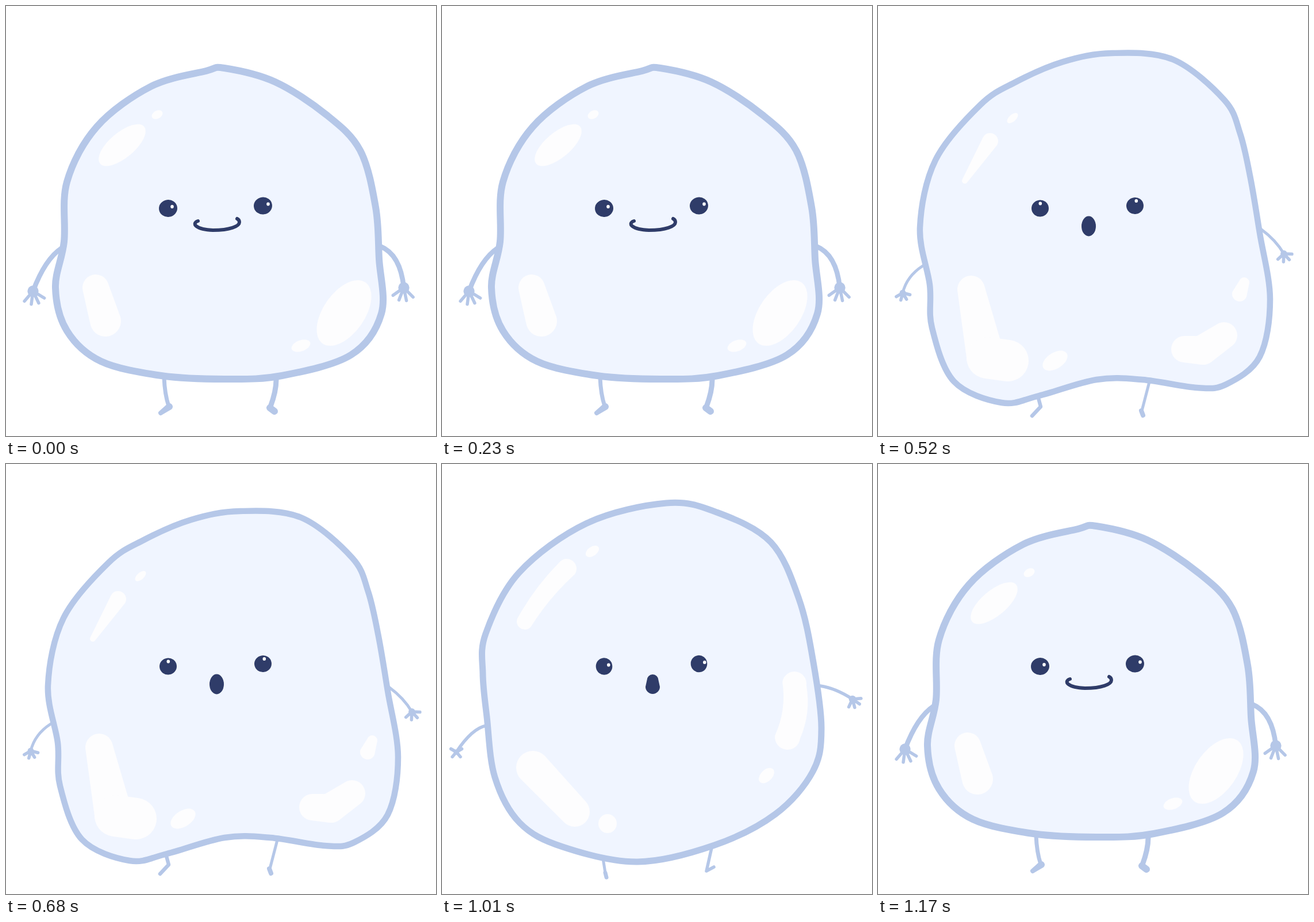
Write an HTML page that moves like this. It is 748 px wide and 748 px high and loops after 1.43 s.

```html
<!DOCTYPE html>
<html lang="en">
<head>
<meta charset="utf-8">
<title>Wobbling blob</title>
<style>
html, body { margin: 0; width: 100%; height: 100%; overflow: hidden; background: #fff; }
svg { display: block; width: 100%; height: 100%; }
</style>
</head>
<body>
<svg id="stage" viewBox="0 0 748 748"></svg>
<script>
const RIM = '#b5c7e8', SKIN = '#f0f5ff', INK = '#2f3c69', SHINE = '#fdfdfe';
const LOOP = 1430;

// Closed smooth curve through a few key points, outlined by the rim.
function body(points, rim) {
  const p = points.split(' ').map(s => s.split(',').map(Number));
  const at = i => p[(i + p.length) % p.length];
  const handle = (i, k) => at(i).map((v, a) => v + k * (at(i + 1)[a] - at(i - 1)[a]) / 6);
  const curves = p.map((_, i) => `C${handle(i, 1)} ${handle(i + 1, -1)} ${at(i + 1)}`);
  return `<path d="M${p[0]}${curves.join('')}Z" fill="${SKIN}" stroke="${RIM}" stroke-width="${rim}"/>`;
}

const oval = (x, y, rx, ry, turn = 0, fill = SHINE) =>
  `<ellipse cx="${x}" cy="${y}" rx="${rx}" ry="${ry}" fill="${fill}" transform="rotate(${turn} ${x} ${y})"/>`;

const line = (d, width, color = RIM) =>
  `<path d="${d}" fill="none" stroke="${color}" stroke-width="${width}" stroke-linecap="round" stroke-linejoin="round"/>`;

// Two round ends of different size joined by gently bent sides.
function bean(x1, y1, r1, x2, y2, r2, bend = 0, fill = SHINE) {
  const length = Math.hypot(x2 - x1, y2 - y1);
  const nx = (y1 - y2) / length, ny = (x2 - x1) / length;
  const off = (x, y, r) => `${x + nx * r} ${y + ny * r}`;
  const middle = r => off((x1 + x2) / 2, (y1 + y2) / 2, bend + r);
  const r = (r1 + r2) / 2;
  return `<path fill="${fill}" d="M${off(x1, y1, r1)}Q${middle(r)} ${off(x2, y2, r2)}
    A${r2} ${r2} 0 0 0 ${off(x2, y2, -r2)}Q${middle(-r)} ${off(x1, y1, -r1)}A${r1} ${r1} 0 0 0 ${off(x1, y1, r1)}Z"/>`;
}

// Arm from a shoulder path to a palm with four evenly fanned fingers.
function arm(shoulder, x, y, width, reach, aim, spread) {
  const fingers = [-1.5, -.5, .5, 1.5].map(i => {
    const a = (aim + i * spread) * Math.PI / 180;
    return `M${x} ${y}l${reach * Math.cos(a)} ${reach * Math.sin(a)}`;
  });
  return line(`M${shoulder} ${x} ${y}`, width) + oval(x, y, reach * .42, reach * .42, 0, RIM) + line(fingers.join(''), 5.5);
}

// Both eyes, with glints shifted towards the gaze.
function eyes(rx, ry, gazeX, gazeY) {
  return [[282, 352, 0], [447, 347.5, 2]].map(([x, y, shift]) =>
    oval(x, y, rx, ry, -8, INK) + oval(x + gazeX + shift, y + gazeY, 2.8, 3.1, 0, '#fff')).join('');
}

const resting = [
  arm('97 421Q68 440', 47, 496, 8.5, 23, 81, 33),
  arm('651 418Q686 432', 692, 490, 8.5, 23, 95, 33),
  line('M275 646Q276 675 283 696', 7),
  bean(284, 697, 6, 269, 708, 4, 0, RIM),
  line('M470 650Q470 670 460 697', 9),
  bean(459, 699, 6, 467, 705, 6, 0, RIM),
  body('380,108 468,132 557,189 616,251 643,350 649,440 653,535 600,607 480,643 380,649 270,643 165,618 106,565 86,490 101,410 106,306 158,210 252,140 348,113', 12),
  oval(202, 242, 50, 22, -40),
  oval(263, 189, 10, 7, -30),
  bean(156, 490, 23, 173, 548, 27),
  oval(588, 534, 65, 36, -55),
  oval(513, 591, 17, 9.5, -20),
  eyes(16, 15, 7, -3),
  line('M334 374C322 378 330 389 360 390C390 390 406 383 406 376Q406 372 402 370', 6, INK)
];

const round = [
  arm('87 439Q70 460', 67, 495, 7, 20, 87, 29),
  arm('663 436Q686 470', 688, 512, 7, 17, 100, 33),
  line('M281 683L283 697L270 711', 8),
  line('M463 682L456 703L461 712', 8),
  oval(375.5, 395.5, 290.1, 304.4, 21.3, RIM),
  oval(375.5, 397.5, 276.5, 292, 21.3, SKIN),
  oval(226, 208, 47, 20, -42),
  oval(283.5, 165, 11, 6, -38),
  bean(160, 474, 23, 232, 589, 25),
  oval(292.5, 627, 17, 14, 12),
  oval(504, 590, 44, 20, -38),
  bean(585, 505, 6.5, 557, 539, 10, -8),
  eyes(16, 15, 7, -3),
  line('M317 376C317 386 340 388 365 391C395 388 413 383 416 369', 5.5, INK)
];

const slumped = [
  arm('78 452Q50 470', 43, 499, 5, 13, 82, 45),
  arm('666 388Q692 407', 706, 431, 5, 14, 70, 45),
  line('M279 682L283 697L268 713', 6.5),
  line('M472 654L459 704', 5),
  line('M458 704L461 712', 8),
  body('407,82 513,93 602,163 630,222 648,300 664,395 682,510 664,610 606,658 555,664 460,650 380,650 280,678 215,690 132,653 94,560 90,485 73,385 100,268 178,172 240,132 322,97', 10.5),
  bean(195, 235, 14, 151, 304, 5),
  oval(234, 195, 11.5, 6, -42),
  bean(162, 493, 24, 187, 610, 33),
  bean(190, 612, 36, 226, 617, 36),
  oval(308, 617, 24, 14, -32),
  bean(533, 597, 23, 565, 599, 25),
  bean(565, 598, 26, 602, 573, 23),
  bean(637, 481, 9, 629, 501, 13),
  eyes(15, 14.5, .3, -8.5),
  oval(366.5, 383, 12.5, 17.5, 0, INK)
];

const stretched = [
  arm('77 455Q52 460', 25, 501, 5.5, 11, 90, 80),
  arm('658 386Q685 390', 714, 409, 5.5, 15, 55, 40),
  line('M280 686L284 711', 5),
  line('M284 711L286 719', 7),
  line('M469 668L460 708L473 701', 5.5),
  body('390,68 478,84 572,136 621,235 646,345 660,460 645,535 580,609 474,663 340,692 210,666 135,624 92,545 78,440 71,365 76,295 134,189 252,103', 11),
  bean(217, 182, 17, 144, 274, 14, 8),
  oval(261.5, 152, 13, 8, -35),
  bean(158, 528, 29, 231, 605, 26),
  oval(288, 625.5, 16, 16.5),
  bean(613, 382, 21, 601, 475, 22, -14),
  oval(564.5, 542, 16, 10, -45),
  eyes(14.3, 14.7, 7.8, -2.5),
  bean(366.5, 376, 10, 366.5, 387.5, 12.5, 0, INK)
];

const timeline = [[0, resting], [390, round], [520, slumped], [780, stretched], [1170, resting]];
const stage = document.getElementById('stage');
let shown;

function draw(ms) {
  const t = ms % LOOP;
  const pose = timeline.filter(([start]) => start <= t).pop()[1];
  if (pose === shown) return;
  stage.innerHTML = pose.join('');
  shown = pose;
}

function tick(now) {
  draw(Math.max(0, now));
  requestAnimationFrame(tick);
}

draw(0);
requestAnimationFrame(tick);
</script>
</body>
</html>
```
